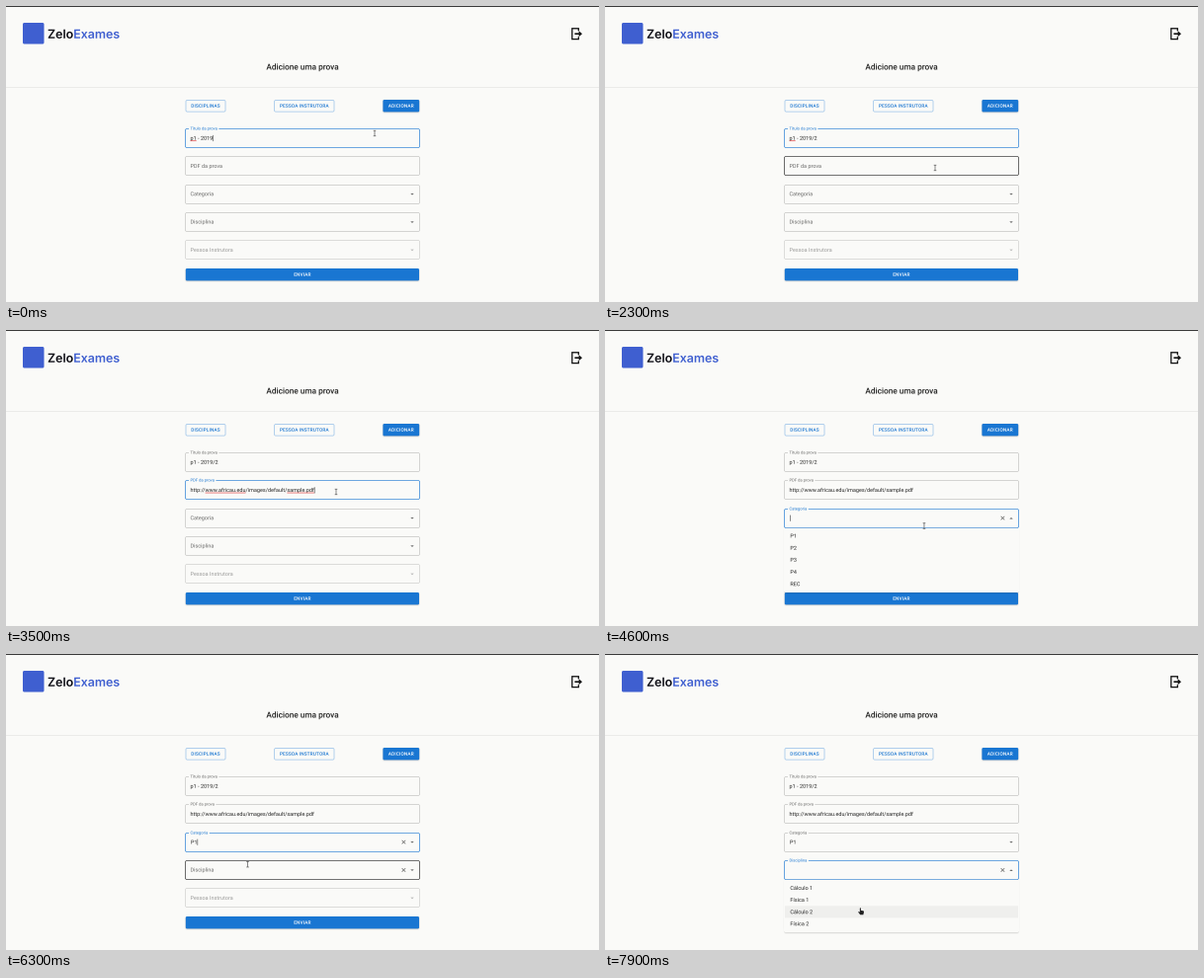
An HTML page with a canvas for the animation above (8000 ms loop, 600x300 px).

```html
<!DOCTYPE html>
<html lang="pt-BR">
<head>
<meta charset="utf-8">
<title>Adicione uma prova</title>
<style>
  html, body { margin: 0; width: 100%; height: 100%; overflow: hidden; background: #fafaf8 }
  canvas { display: block }
</style>
</head>
<body>
<canvas id="stage" width="600" height="300"></canvas>
<script>
// The page is drawn large and scaled down, which keeps the tiny text even
const ZOOM = 4;
const screen2d = document.getElementById('stage').getContext('2d');
screen2d.imageSmoothingQuality = 'high';
const page = document.createElement('canvas');
page.width = 600 * ZOOM;
page.height = 300 * ZOOM;
const ctx = page.getContext('2d');
ctx.scale(ZOOM, ZOOM);

const LOOP = 8000, BLINK = 560, LEFT = 181.5, RIGHT = 418.5;
const BG = '#fafaf8', BLUE = [25, 118, 210], GRAY = [102, 102, 101];
const rgb = c => `rgb(${c})`;
const ink = a => `rgba(0,0,0,${a})`;
const clamp = v => Math.max(0, Math.min(1, v));
const mix = (a, b, p) => a + (b - a) * p;

// Mouse path: time, x, y
const PATH = [
  [0, 373, 129], [1920, 373, 129], [2050, 384, 104], [2280, 334, 164],
  [3520, 334, 164], [4080, 323, 198.5], [4600, 323, 198.5], [4840, 312, 211],
  [5020, 312, 211], [5400, 285, 226], [5790, 244, 213], [6290, 244, 213],
  [6900, 271.5, 223.5], [7120, 271.5, 223.5], [7860, 259, 261]
];
const CARET_RESETS = [-260, 700, 1400, 2480, 3300, 4290, 4980, 6980];
const PICK = 4860;
const URL_TEXT = 'http://www.africau.edu/images/default/sample.pdf';

const FIELDS = [
  { label: 'Título da prova', focus: -1000, blur: 2480, misspelt: ['p1'],
    value: t => 'p1 - 2019' + (t < 700 ? '' : t < 1400 ? '/' : '/2') },
  { label: 'PDF da prova', focus: 2480, blur: 4290, misspelt: ['www.africau.edu', 'sample.pdf'],
    value: t => t < 3300 ? '' : URL_TEXT },
  { label: 'Categoria', focus: 4290, blur: 6980, close: PICK,
    options: ['P1', 'P2', 'P3', 'P4', 'REC'], value: t => t < PICK ? '' : 'P1' },
  { label: 'Disciplina', focus: 6980, blur: LOOP + 1, close: LOOP + 1,
    options: ['Cálculo 1', 'Física 1', 'Cálculo 2', 'Física 2'], value: () => '' },
  { label: 'Pessoa Instrutora', focus: Infinity, blur: Infinity, options: [], disabled: true, value: () => '' }
];
FIELDS.forEach((f, i) => {
  f.y = 133.9 + 28.35 * i;
  f.top = Math.floor(f.y - 9.43) + .5;
  f.bottom = Math.floor(f.y + 9.43) + .5;
});

function setFont(size, weight = 400, family = 'Roboto', spacing = .00938) {
  ctx.font = `${weight} ${size}px ${family}, sans-serif`;
  ctx.letterSpacing = size * spacing + 'px';
  ctx.textRendering = 'geometricPrecision';
}
// Draws text centred vertically on y and returns its width
function text(str, x, y, size, color, { weight, family, spacing, align = 'left' } = {}) {
  setFont(size, weight, family, spacing);
  ctx.textAlign = align;
  ctx.fillStyle = color;
  ctx.fillText(str, x, y + size * .342);
  return ctx.measureText(str).width;
}
function box(x, y, w, h, r, fill, stroke, lineWidth = .8) {
  ctx.beginPath();
  ctx.roundRect(x, y, w, h, r);
  if (fill) { ctx.fillStyle = fill; ctx.fill(); }
  if (stroke) { ctx.strokeStyle = stroke; ctx.lineWidth = lineWidth; ctx.stroke(); }
}
function line(d, color, width) {
  ctx.strokeStyle = color;
  ctx.lineWidth = width;
  ctx.stroke(new Path2D(d));
}
function shadow(draw) {
  ctx.save();
  ctx.shadowColor = ink(.25);
  ctx.shadowBlur = 1.4 * ZOOM;
  ctx.shadowOffsetY = .5 * ZOOM;
  draw();
  ctx.restore();
}

function mouseAt(t) {
  const i = PATH.findIndex(p => p[0] > t);
  if (i < 0) return PATH.at(-1).slice(1);
  const [t0, x0, y0] = PATH[i - 1], [t1, x1, y1] = PATH[i];
  const p = (t - t0) / (t1 - t0);
  return [mix(x0, x1, p), mix(y0, y1, p)];
}

function button(label, x, y, w, filled, mouse) {
  const over = mouse[0] > x && mouse[0] < x + w && Math.abs(mouse[1] - y) < 6;
  const style = { weight: 500, spacing: .02857, align: 'center' };
  if (filled) shadow(() => box(x, y - 6.2, w, 12.4, 1.3, over ? '#1565c0' : rgb(BLUE)));
  else box(x + .3, y - 5.7, w - .6, 11.6, 1.3, null, 'rgba(25,118,210,.45)', .7);
  text(label, x + w / 2, y, 4.74, filled ? '#fff' : rgb(BLUE), style);
  return over;
}

function drawHeader() {
  ctx.fillStyle = BG;
  ctx.fillRect(0, 0, 600, 300);
  ctx.fillStyle = '#3a3a3a';
  ctx.fillRect(0, 0, 600, 1);
  ctx.fillStyle = '#ebebe9';
  ctx.fillRect(0, 82, 600, 1);
  box(17, 17, 21.5, 21.5, 1.5, '#3f5fd0');
  const brand = { weight: 600, family: 'Inter', spacing: 0 };
  const w = text('Zelo', 42, 28.5, 12.4, '#0c0c14', brand);
  text('Exames', 42 + w, 28.5, 12.4, '#3f5fd0', brand);
  line('M579.3 25.2V22.8H572.8V33.6H579.3V31.2', '#111', 1.3);
  ctx.fillStyle = '#111';
  ctx.fill(new Path2D('M575.4 27.4H579.6V25.2L583 28.2L579.6 31.2V29H575.4z'));
  text('Adicione uma prova', 300, 61.7, 8.25, ink(.87), { weight: 500, spacing: 0, align: 'center' });
}

function underline(str, word, x, y) {
  setFont(5.4);
  const start = x + ctx.measureText(str.slice(0, str.indexOf(word))).width;
  line(`M${start} ${y + 2.8}h${ctx.measureText(word).width}`, 'rgba(225,40,40,.85)', .7);
}

function drawField(f, t, mouse, popup) {
  const focused = t >= f.focus && t < f.blur;
  const covered = popup && f.y > popup.y;
  const hovered = !f.disabled && !covered && mouse[0] > LEFT && mouse[0] < RIGHT &&
    mouse[1] > f.top && mouse[1] < f.bottom;
  const shrink = 1 - (1 - clamp((t - f.focus) / 200)) ** 3;
  const notch = clamp((t - f.focus - 50) / 100);
  const tint = focused ? shrink : t >= f.blur ? (1 - clamp((t - f.blur) / 200)) ** 3 : 0;
  const border = focused ? rgb(BLUE) : hovered ? ink(.87) : ink(f.disabled ? .2 : .25);
  box(LEFT, f.top, RIGHT - LEFT, f.bottom - f.top, 1.5, null, border, focused || hovered ? .65 : .6);

  const size = mix(5.4, 4.05, shrink);
  const labelY = mix(f.y - .2, f.top - .5, shrink);
  if (notch > 0) {
    setFont(4.05);
    ctx.fillStyle = BG;
    ctx.fillRect(185, f.top - 1, (ctx.measureText(f.label).width + 3) * notch, 2);
  }
  const color = GRAY.map((c, i) => Math.round(mix(c, BLUE[i], tint)));
  text(f.label, 186.5, labelY, size, f.disabled ? ink(.38) : rgb(color));

  const value = f.value(t), x = f.options ? 187 : 186.5;
  const end = x + text(value, x, f.y, 5.4, ink(.87));
  if (focused) {
    if (value) (f.misspelt || []).forEach(word => underline(value, word, x, f.y));
    const reset = CARET_RESETS.findLast(r => r <= t);
    const picked = f.close === PICK && t >= PICK && t < 4980;
    if (!picked && Math.floor((t - reset) / BLINK) % 2 === 0) {
      ctx.fillStyle = ink(.75);
      ctx.fillRect(end, f.y - 3, .6, 6.2);
    }
  }
  if (f.options) {
    const dir = popup === f ? -1 : 1;
    ctx.fillStyle = ink(f.disabled ? .26 : .58);
    ctx.fill(new Path2D(`M409.3 ${f.y + .2 - .85 * dir}h3.4l-1.7 ${1.7 * dir}z`));
    if (focused || hovered)
      line(`M400.6 ${f.y - 1.8}l3.6 3.6m0 -3.6l-3.6 3.6`, ink(.6), .7);
  }
  return hovered;
}

function drawPopup(f, mouse) {
  const top = f.bottom + .3, row = 12.13, first = f.y + 12.1;
  const bottom = first + f.options.length * row + 2.7;
  let over = false;
  shadow(() => box(181.7, top, 236.6, bottom - top, 1.3, BG));
  ctx.fillStyle = BG;
  ctx.fillRect(181, top, 238, bottom - top - 1);
  f.options.forEach((option, i) => {
    const y = first + row * i;
    if (mouse[1] >= y && mouse[1] < y + row) {
      over = true;
      ctx.fillStyle = ink(.045);
      ctx.fillRect(182, y, 236, row);
    }
    text(option, 187.4, y + row / 2, 5.4, ink(.87));
  });
  return over;
}

const HAND = new Path2D('M-1.2 -3.4q.6 -.7 1.1 0v2.2l2.6 .6q.6 .3 .5 1l-.6 2.9h-3.2l-2 -2.6q0 -.8 .8 -.6l.8 .6z');
const ARROW = new Path2D('M0 0v6l1.4 -1.2l.9 2l.9 -.4l-.9 -1.9h1.9z');
function drawMouse([x, y], kind) {
  ctx.save();
  ctx.translate(x, y);
  if (kind === 'text') {
    line('M-1.3 -2.8h2.6M0 -2.8v5.6M-1.3 2.8h2.6', '#555', .7);
  } else {
    const shape = kind === 'hand' ? HAND : ARROW;
    ctx.strokeStyle = '#fff';
    ctx.lineWidth = .8;
    ctx.stroke(shape);
    ctx.fillStyle = '#222';
    ctx.fill(shape);
  }
  ctx.restore();
}

function draw(t) {
  const mouse = mouseAt(t);
  const popup = FIELDS.find(f => t >= f.focus && t < f.close);
  drawHeader();
  let kind = 'arrow';
  const buttons = [
    ['DISCIPLINAS', 181.7, 101.2, 40.6, false], ['PESSOA INSTRUTORA', 271.3, 101.2, 61, false],
    ['ADICIONAR', 381.4, 101.2, 36.8, true], ['ENVIAR', 181.8, 272.2, 236.2, true]
  ];
  for (const b of buttons) if (button(...b, mouse)) kind = 'hand';
  for (const f of FIELDS) if (drawField(f, t, mouse, popup)) kind = 'text';
  if (popup && drawPopup(popup, mouse)) kind = 'hand';
  drawMouse(mouse, kind);
  screen2d.drawImage(page, 0, 0, 600, 300);
}

function tick() {
  draw(performance.now() % LOOP);
  requestAnimationFrame(tick);
}
tick();
</script>
</body>
</html>
```
